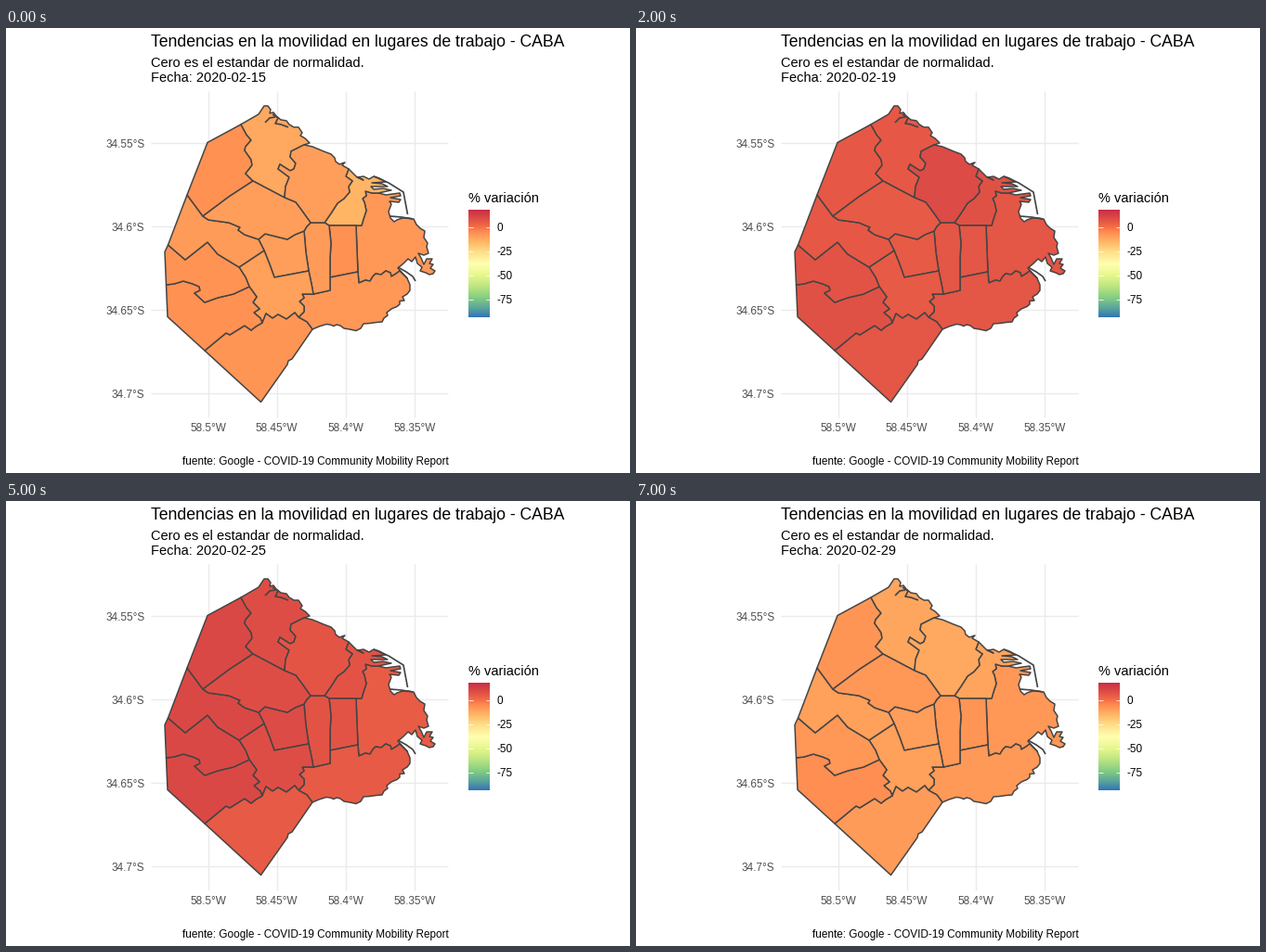
A matplotlib script that plays this animation: 672 by 480 pixels, repeating every 8000 ms.

```python
import numpy as np
import matplotlib.pyplot as plt
from matplotlib.animation import FuncAnimation
from matplotlib.colors import LinearSegmentedColormap, Normalize
from matplotlib.patches import Polygon

W, H, DPI = 672, 480, 96
PX = 72 / DPI
INK = "#444444"
plt.rcParams["font.family"] = "Liberation Sans"

# Outer boundary, in stage pixels
out12 = [(253, 104), (217, 123.5), (195, 180)]
out11 = [(195, 180), (174.5, 234)]
out10 = [(174.5, 234), (171, 241.5), (172.5, 277)]
out9 = [(172.5, 277), (174, 311.5), (214, 348)]
out8 = [(214, 348), (274.5, 403.5), (303, 363), (304, 359), (308, 357), (330, 325)]
out4 = [(330, 325), (337, 322), (345, 319.5), (349, 320), (353, 321.5), (356, 320),
        (360, 321), (364, 324), (370, 325), (377, 326.5), (382, 324), (385, 319),
        (392, 318.5), (399, 317.5), (405, 317), (407, 313), (411, 310), (410, 307),
        (415, 303), (421, 300.5), (424, 298), (424, 294.5), (429, 294), (427, 290),
        (432, 287), (435, 283), (435, 277), (432, 270)]
out1 = [(432, 270), (422, 259), (428, 254), (433, 249), (437, 252), (441, 247),
        (443, 254), (448, 258), (446, 262), (452, 264), (456, 266), (460, 265),
        (462, 262), (457, 259), (460, 255), (456, 254), (459, 249), (453, 249),
        (450, 255), (447, 248), (444, 243), (450, 245), (455, 243), (453, 236),
        (454, 232), (450, 226), (451, 219), (446, 216), (442, 212), (439, 206),
        (433, 205), (427, 205), (421, 207), (418, 209), (414, 205), (412, 198),
        (415, 190), (413, 187), (423, 188), (425, 185), (414, 183), (425, 181),
        (424, 178), (409, 180), (401, 178)]
out2 = [(401, 178), (415, 175), (406, 173), (396, 174), (393, 171), (411, 171),
        (405, 168), (394, 167), (409, 166), (402, 162), (396, 160), (391, 163),
        (385, 160), (379, 161), (385, 164), (378, 161), (373, 156), (369, 152)]
out14 = [(321, 126), (330, 128), (342, 133), (350, 136), (354, 140), (355, 144),
         (359, 147), (365, 145), (362, 148), (369, 152)]
out13 = [(253, 104), (272, 93), (278, 84), (282, 84), (285, 88), (284, 92),
         (288, 91), (291, 95), (296, 99), (302, 100), (305, 104), (310, 107),
         (315, 107), (319, 113), (317, 116), (322, 119), (327, 124), (321, 126)]

# Borders between districts
b12_13 = [(253, 104), (259, 115), (264, 121), (258, 128), (257, 132), (264, 142),
          (265, 148), (258, 157), (266, 165)]
b11_12 = [(195, 180), (212, 203)]
b12_15 = [(212, 203), (240, 182), (266, 165)]
b13_15 = [(266, 165), (283, 174), (300, 183)]
b13_14 = [(321, 126), (307, 133), (306, 139), (312, 146), (310, 152), (306, 154),
          (295, 147), (293, 152), (305, 161), (301, 171), (300, 183)]
b14_15 = [(300, 183), (312, 188), (318, 196), (328, 210)]
b2_14 = [(369, 152), (366, 160), (373, 165), (369, 171), (370, 177), (364, 184),
         (357, 189), (350, 200), (343, 210)]
b5_14 = [(328, 210), (343, 210)]
b2_5 = [(343, 210), (348, 213)]
b2_3 = [(348, 213), (377, 213)]
b1_2 = [(377, 213), (383, 213), (385, 206), (388, 197), (386, 188), (384, 184),
        (388, 181), (387, 176), (394, 178), (401, 178)]
b11_15 = [(212, 203), (218, 207), (240, 210), (252, 215), (250, 218), (257, 223),
          (272, 228)]
b6_11 = [(272, 228), (278, 240)]
b7_11 = [(278, 240), (251, 258)]
b10_11 = [(174.5, 234), (193, 250), (217, 231), (228, 244), (251, 258)]
b6_15 = [(272, 228), (279, 222), (303, 228), (311, 223), (321, 219)]
b5_15 = [(321, 219), (324, 214), (328, 210)]
b5_6 = [(321, 219), (323, 242), (326, 262)]
b6_7 = [(278, 240), (284, 255), (289, 269), (326, 262)]
b5_7 = [(326, 262), (329, 276), (331, 287)]
b4_5 = [(331, 287), (349, 283), (349, 269)]
b3_5 = [(349, 269), (349, 248), (350, 232), (348, 213)]
b3_4 = [(349, 269), (379, 263)]
b1_3 = [(377, 213), (378, 240), (379, 263)]
b1_4 = [(379, 263), (380, 275), (387, 272), (392, 273), (395, 268), (398, 265),
        (404, 266), (409, 262), (414, 264), (415, 268), (420, 265), (424, 262),
        (432, 270)]
b7_10 = [(251, 258), (258, 269), (262, 279)]
b9_10 = [(172.5, 277), (181, 276), (191, 273), (201, 276), (208, 279), (209, 283),
         (203, 286), (214, 296), (228, 291), (245, 287), (262, 279)]
b7_9 = [(262, 279), (270, 290), (266, 296), (273, 303), (267, 307), (274, 313),
        (276, 318)]
b8_9 = [(276, 318), (269, 322), (264, 326), (257, 321), (241, 331), (237, 329),
        (214, 348)]
b7_8 = [(276, 318), (280, 308), (287, 313), (293, 309), (302, 314), (311, 307),
        (315, 312)]
b4_8 = [(315, 312), (324, 317), (330, 325)]
b4_7 = [(315, 312), (321, 306), (321, 300), (316, 295), (321, 291), (319, 287),
        (331, 287)]

extras = [
    [(396, 160), (403, 163), (412, 167), (428, 177), (432.5, 201)],
    [(279, 102), (284, 97), (290, 96)],
    [(287, 93), (293, 97), (290, 103), (296, 104), (304, 107)],
    [(414, 203), (426, 204), (438, 206)],
    [(422, 258), (431, 263), (438, 268), (441, 273)],
]


def ring(*arcs):
    """Chain arcs into one closed outline, flipping them where needed."""
    pts = list(arcs[0])
    if pts[-1] not in (arcs[1][0], arcs[1][-1]):
        pts.reverse()
    for arc in arcs[1:]:
        pts += arc[1:] if arc[0] == pts[-1] else arc[-2::-1]
    return pts


districts = [
    ring(b1_3, b1_4, out1, b1_2),
    ring(b2_14, b2_5, b2_3, b1_2, out2),
    ring(b2_3, b1_3, b3_4, b3_5),
    ring(b4_8, out4, b1_4, b3_4, b4_5, b4_7),
    ring(b5_15, b5_6, b5_7, b4_5, b3_5, b2_5, b5_14),
    ring(b6_15, b6_11, b6_7, b5_6),
    ring(b6_7, b5_7, b4_7, b7_8, b7_9, b7_10, b7_11),
    ring(out8, b4_8, b7_8, b8_9),
    ring(b9_10, b7_9, b8_9, out9),
    ring(out10, b9_10, b7_10, b10_11),
    ring(out11, b10_11, b7_11, b6_11, b11_15, b11_12),
    ring(out12, b11_12, b12_15, b12_13),
    ring(out13, b13_14, b13_15, b12_13),
    ring(out14, b2_14, b5_14, b14_15, b13_14),
    ring(b12_15, b13_15, b14_15, b5_15, b6_15, b11_15),
]

# Percent change for districts 1 to 15
sat_a = [-8, -15, -6.5, -8, -9, -9.5, -10, -7.5, -6.5, -7, -9, -6.5, -12, -9.5, -9.5]
mon = [6, 7.5, 6, 6, 6, 5, 5, 6, 7.5, 7, 5.5, 5.5, 5.5, 9, 5]
fri = [-2.5, -6.5, -5, -4.5, -4.5, -3, -4, -5, -4, -3.5, -1, -3.5, -3.5, -4, -5]
sun = [-60, -71, -64, -63, -69, -74.5, -68, -56, -63, -67, -68, -73, -73.5, -70.5, -68]
tue = [4.5, 7, 7, 5, 7, 9, 8.5, 5, 10, 10, 10, 10, 8.5, 6.5, 8.5]
sat_b = [-8, -11, -7.5, -8.5, -8, -9.5, -10, -9, -6, -8, -10, -7.5, -11.5, -12, -8]
days = [sat_a, mon, mon, fri, sun, tue, tue, sat_b]

LOW, HIGH = -93, 17.5
stops = [(-93, "#3373B5"), (-85, "#559FA0"), (-74, "#80CB84"), (-68, "#9CD881"),
         (-60, "#C3E883"), (-50, "#E6F78C"), (-38, "#FFFFB0"), (-25, "#FEDC86"),
         (-15, "#FFB564"), (-10, "#FFA05B"), (-5, "#FF8A50"), (0, "#F56E47"),
         (5, "#E75A45"), (10, "#DA4845"), (17.5, "#C92D48")]
norm = Normalize(LOW, HIGH)
cmap = LinearSegmentedColormap.from_list(
    "change", [(float(norm(v)), c) for v, c in stops], N=1024)

fig = plt.figure(figsize=(W / DPI, H / DPI), dpi=DPI, facecolor="white")
ax = fig.add_axes([0, 0, 1, 1])
ax.axis("off")


def text(x, y, s, size, color="black", **kw):
    return ax.text(x, y, s, fontsize=size, color=color, **kw)


def line(pts, color, width, z):
    ax.plot(*zip(*pts), color=color, lw=width * PX, zorder=z,
            solid_capstyle="butt", solid_joinstyle="round")


# Graticule with labels
for k in range(4):
    x, y = 217.7 + 74 * k, 124.3 + 90 * k
    line([(x, 67.5), (x, 419.5)], "#EBEBEB", 1.42, 1)
    line([(156, y), (476, y)], "#EBEBEB", 1.42, 1)
    text(x, 435.3, f"{58.5 - 0.05 * k:.4g}°W", 8.8, "#4D4D4D", ha="center")
    text(149.5, y + 4.4, f"{34.55 + 0.05 * k:.4g}°S", 8.8, "#4D4D4D", ha="right")

# Map
shapes = [Polygon(p, closed=True, ec=INK, lw=1.5 * PX, joinstyle="round", zorder=3)
          for p in districts]
for shape in shapes:
    ax.add_patch(shape)
for pts in extras:
    line(pts, INK, 1.7, 4)

# Legend
TOP, BOTTOM, LEFT, RIGHT = 196.5, 312, 498.3, 521.3
ramp = np.linspace(HIGH, LOW, 300)[:, None]
ax.imshow(ramp, cmap=cmap, norm=norm, extent=(LEFT, RIGHT, BOTTOM, TOP),
          aspect="auto", interpolation="bilinear", zorder=2)
text(498.3, 188, "% variación", 11)
for v in (0, -25, -50, -75):
    y = TOP + (HIGH - v) / (HIGH - LOW) * (BOTTOM - TOP)
    for x in (LEFT, RIGHT - 4.6):
        line([(x, y), (x + 4.6, y)], "white", 0.8, 3)
    text(528.3, y + 4.2, str(v), 8.8)

text(155.8, 20, "Tendencias en la movilidad en lugares de trabajo - CABA", 13.2)
text(155.8, 42, "Cero es el estandar de normalidad.", 11)
date = text(155.8, 58, "", 11)
text(476.3, 471, "fuente: Google - COVID-19 Community Mobility Report", 8.8, ha="right")

ax.set_xlim(0, W)
ax.set_ylim(H, 0)


def draw(i):
    date.set_text(f"Fecha: 2020-02-{15 + 2 * i}")
    for shape, value in zip(shapes, days[i]):
        shape.set_facecolor(cmap(norm(value)))
    return [date, *shapes]


anim = FuncAnimation(fig, draw, frames=len(days), interval=1000, repeat=True,
                     repeat_delay=0, blit=False)
plt.show()
```
